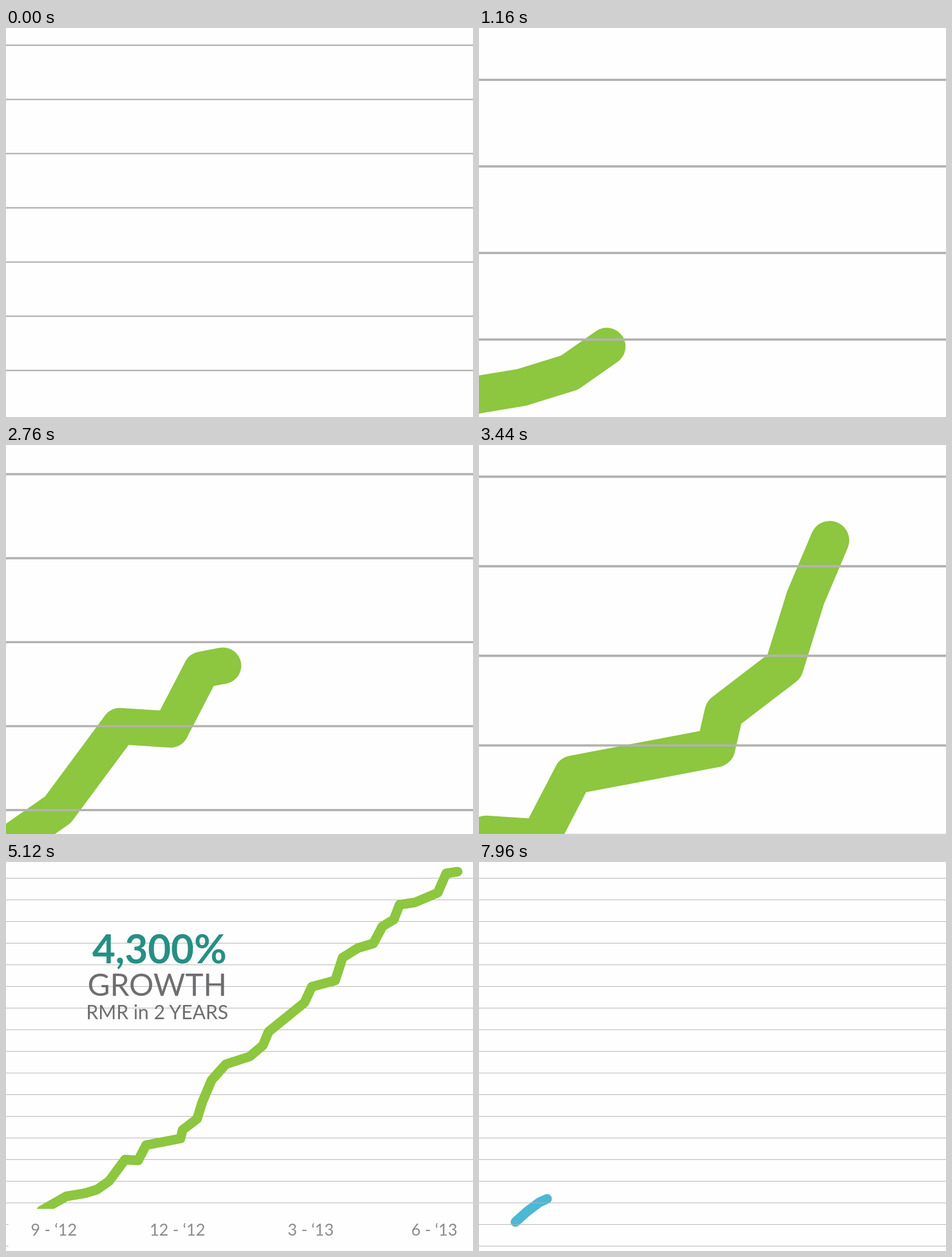
These frames come from a looping animation (820x683 px, 8 s). An HTML page:

```html
<!DOCTYPE html>
<html lang="en">
<head>
<meta charset="utf-8">
<title>Growth chart</title>
<style>
  html, body { margin: 0; width: 100%; height: 100%; overflow: hidden; background: #fefefe; }
  svg { display: block; width: 100vw; height: 100vh; }
  text { font-family: Lato, "Open Sans", sans-serif; text-anchor: middle; }
  .curve { fill: none; stroke: #8dc63f; stroke-width: 16.5; stroke-linecap: round; stroke-linejoin: round; }
  .grey { fill: #6d6e70; }
  .label { fill: #8a8b8d; font-size: 28.5px; }
  #blue { stroke: #4bb8d4; stroke-width: 17; }
  #grid { stroke: #b2b2b2; }
</style>
</head>
<body>
<svg viewBox="0 0 820 683">
  <defs>
    <clipPath id="plot"><rect y="-50" width="900" height="659"/></clipPath>
    <path id="green" class="curve" clip-path="url(#plot)" d="M62 612 106 587 139 581.5 160 575 181 560.3
      209 522.5 232 524 246 497 306.5 485.5 310 470.5 335.5 451 344.5 422 361 383 386 355 428 341.5
      451 322 461 298 524 247 537 219 578 208 591 168 618 151 645 143 661 113 681 101 691 75 718 71
      758 54 773 20 793 17"/>
  </defs>
  <g class="scene"><use href="#green"/></g>
  <path id="blue" class="curve" d="M64 632 84 614 106 597.5 119.5 591.5"/>
  <path id="grid"/>
  <g class="scene">
    <rect x="4.5" y="609" width="900" height="200" fill="#fefefe"/>
    <text x="269.5" y="178" font-size="70" font-weight="700" fill="#268f83">4,300%</text>
    <text x="265.5" y="235" font-size="54" class="grey">GROWTH</text>
    <text x="265.5" y="276" font-size="34" class="grey">RMR in 2 YEARS</text>
    <g class="label">
      <text x="84" y="656">9 - ‘12</text>
      <text x="301" y="656">12 - ‘12</text>
      <text x="535" y="656">3 - ‘13</text>
      <text x="752" y="656">6 - ‘13</text>
    </g>
    <use id="overlay" href="#green"/>
  </g>
</svg>
<script>
const LOOP = 8000, ROWS = 18, SPACING = 38, FIRST = 28.5;
const PAUSE_LENGTH = 202; // the curve rests here before its second stroke
const ZOOM_LEAD = 40;     // the curve zooms slightly ahead of the grid

const $ = id => document.getElementById(id);
const scenes = document.querySelectorAll(".scene");
const greenLength = $("green").getTotalLength();

const mix = (a, b, u) => a + (b - a) * u;
const progress = (t, from, to) => Math.min(1, Math.max(0, (t - from) / (to - from)));
const smooth = u => u * u * (3 - 2 * u);

// Close-up framing that follows the tip, keyed by the length drawn so far.
const closeUps = [
  { drawn: 0, scale: 4, x: -330, y: -1790 },
  { drawn: 126, scale: 4, x: -481, y: -1695 },
  { drawn: 242, scale: 3.88, x: -611, y: -1533.8 },
  { drawn: 398, scale: 4.14, x: -853, y: -1478.5 },
  { drawn: 548, scale: 3.966, x: -905, y: -1277 }
];

function closeUp(drawn) {
  const next = Math.max(1, closeUps.findIndex(k => k.drawn > drawn));
  const index = drawn >= closeUps.at(-1).drawn ? closeUps.length - 1 : next;
  const a = closeUps[index - 1], b = closeUps[index];
  const u = progress(drawn, a.drawn, b.drawn);
  return { scale: mix(a.scale, b.scale, u), x: mix(a.x, b.x, u), y: mix(a.y, b.y, u) };
}

// Blend between the whole chart and the close-up.
function camera(t, drawn) {
  const zoom = smooth(progress(t, -500, 500)) - smooth(progress(t, 3800, 4880));
  const near = closeUp(drawn);
  return { scale: mix(1, near.scale, zoom), x: near.x * zoom, y: near.y * zoom };
}

function greenDrawn(t) {
  const first = PAUSE_LENGTH * progress(t, 500, 1560);
  const second = (greenLength - PAUSE_LENGTH) * progress(t, 2400, 5100) ** 1.5;
  return first + second;
}

function draw(path, length) {
  path.setAttribute("stroke-dasharray", `${length} 2000`);
  path.setAttribute("visibility", length > 0 ? "visible" : "hidden");
}

$("grid").setAttribute("d",
  Array.from({ length: ROWS }, (_, i) => `M0 ${FIRST + SPACING * i}h820`).join(""));

function render(t) {
  const drawn = greenDrawn(t);
  draw($("green"), drawn);
  draw($("blue"), Math.min(71, Math.max(0, (t - 7650) * 0.23)));

  const back = camera(t, drawn);
  $("grid").setAttribute("transform", `translate(0 ${back.y}) scale(1 ${back.scale})`);

  const front = camera(t + ZOOM_LEAD, drawn);
  const fade = 1 - progress(t, 7440, 7640);
  scenes.forEach(scene => {
    scene.setAttribute("transform", `translate(${front.x} ${front.y}) scale(${front.scale})`);
    scene.setAttribute("opacity", fade);
  });
  $("overlay").setAttribute("opacity", progress(t, 4900, 5120));
}

const start = performance.now();
function tick() {
  render((performance.now() - start) % LOOP);
  requestAnimationFrame(tick);
}
tick();
</script>
</body>
</html>
```
